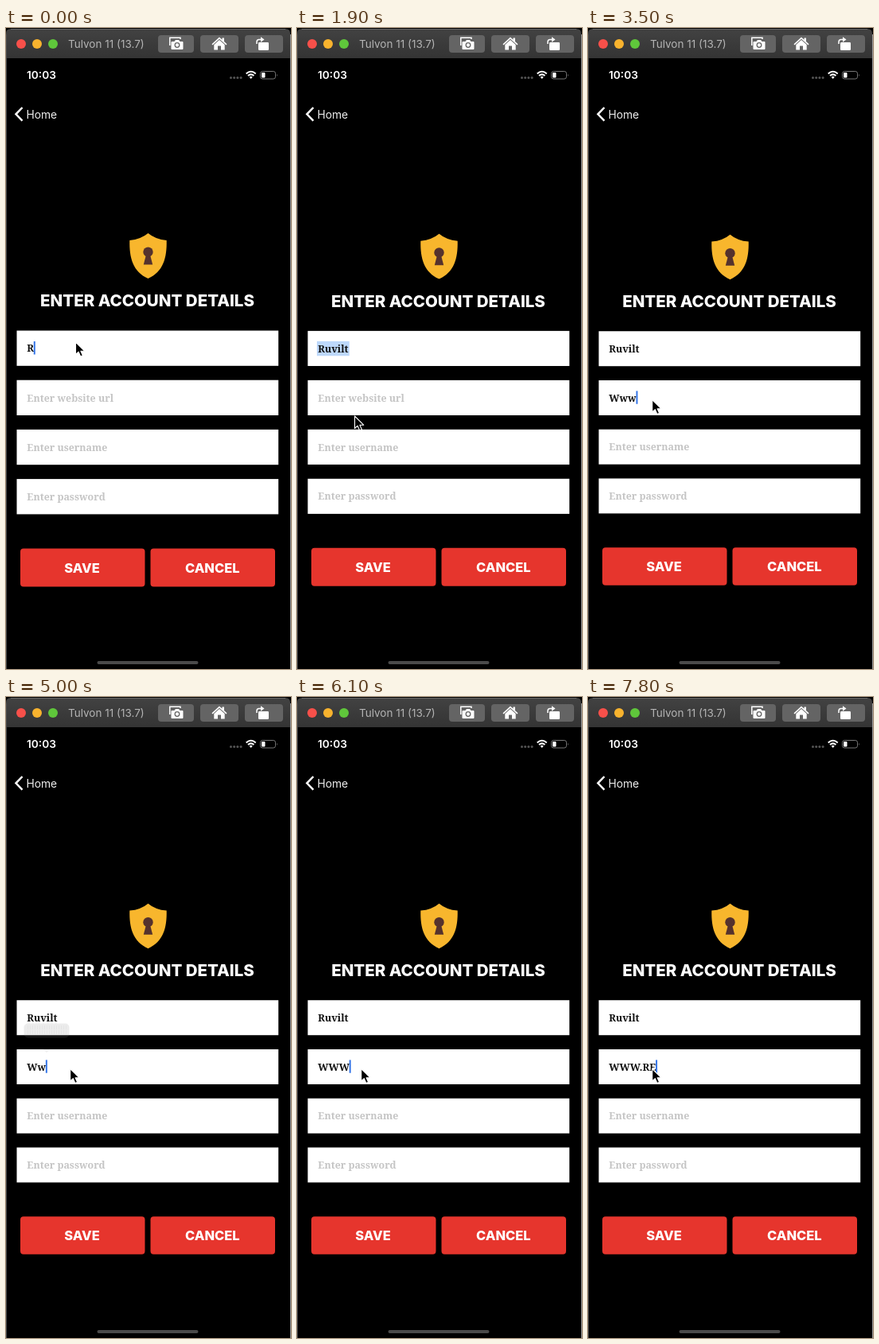
Write an HTML page that moves like this. It is 358 px wide and 806 px high and loops after 8000 ms.

```html
<!DOCTYPE html>
<html lang="en">
<head>
<meta charset="utf-8">
<title>Account details</title>
<style>
  html, body { margin: 0; width: 100%; height: 100%; overflow: hidden; background: #000; }
  svg { display: block; width: 100vw; height: 100vh; }
  text { font-family: Inter, Roboto, sans-serif; fill: #fff; white-space: pre; }
  .field { font: 600 12.4px "Noto Serif", "Liberation Serif", serif; }
  .heading { font-weight: 800; font-size: 20.5px; text-anchor: middle; }
  .button { font-weight: 800; font-size: 16.5px; text-anchor: middle; }
</style>
</head>
<body>
<svg viewBox="0 0 358 806" preserveAspectRatio="none">
  <defs>
    <linearGradient id="bar" x2="0" y2="1">
      <stop stop-color="#424242"/><stop offset="1" stop-color="#343434"/>
    </linearGradient>
  </defs>
  <rect width="358" height="806"/>

  <!-- window bar -->
  <path d="M0 38V7Q0 1 6 1H351Q357 1 357 7V38Z" fill="url(#bar)"/>
  <path d="M6 1.5H351" stroke="#6a6a6a"/>
  <path d="M.5 8V806" stroke="#4c4c4c"/>
  <path d="M357.5 8V806" stroke="#999"/>
  <circle cx="19" cy="20" r="6" fill="#f7504a"/>
  <circle cx="39" cy="20" r="6" fill="#f8b32e"/>
  <circle cx="59" cy="20" r="6" fill="#5fc73b"/>
  <text x="78" y="24.7" font-size="13.5" style="fill:#b4b4b4">Tulvon 11 (13.7)</text>
  <g fill="#646464">
    <rect x="191" y="9" width="45" height="22" rx="4"/>
    <rect x="244" y="9" width="48" height="22" rx="4"/>
    <rect x="300" y="9" width="48" height="22" rx="4"/>
  </g>
  <g fill="#fff">
    <path d="M205.8 22V12.300H219V14" fill="none" stroke="#fff" stroke-width="1.500"/>
    <path d="M208.500 17h3l1.500-2h4l1.500 2h3q1 0 1 1v8q0 1-1 1h-13q-1 0-1-1v-8q0-1 1-1Z"/>
    <circle cx="215" cy="21.500" r="2.800" fill="none" stroke="#646464" stroke-width="1.300"/>
    <path d="M258.500 20.300L268 11.500l3.500 3.200V12.500h2.500v4.500l3.500 3.300-1 1.200L268 13.800l-8.500 7.700Z"/>
    <path d="M261.300 21L268 15l6.700 6v6.500h-4.700v-5h-4v5h-4.700Z"/>
    <rect x="317" y="18" width="13" height="10" rx="1.300"/>
    <path d="M315 20v-2.500q0-3 3-3h3" fill="none" stroke="#fff" stroke-width="1.500"/>
    <path d="M320 11.200l4.500 3.300-4.500 3.300Z"/>
  </g>

  <!-- phone status -->
  <text x="26" y="64" font-size="13.7" font-weight="600">10:03</text>
  <g fill="#555">
    <circle cx="282.500" cy="62.500" r="1.500"/><circle cx="286.700" cy="62.500" r="1.500"/>
    <circle cx="290.900" cy="62.500" r="1.500"/><circle cx="295.100" cy="62.500" r="1.500"/>
  </g>
  <path d="M301.700 57.500Q307.700 52 313.700 57.500M304 60Q307.700 56.700 311.400 60" fill="none" stroke="#fff" stroke-width="2"/>
  <path d="M305.700 61.700Q307.700 60 309.700 61.700L307.700 64Z" fill="#fff"/>
  <rect x="319.500" y="54.500" width="19" height="9.500" rx="2.700" fill="none" stroke="#777"/>
  <rect x="321" y="56" width="4.500" height="6.500" rx="1" fill="#fff"/>
  <path d="M340 57.700q1.600 1.500 0 3.200Z" fill="#777"/>

  <path d="M20.500 100L12.500 108.300L20.500 116.600" fill="none" stroke="#fff" stroke-width="2.500"/>
  <text x="25.500" y="113.500" font-size="13.8" style="fill:#eee">Home</text>
  <rect x="114.500" y="796" width="127" height="4" rx="2" fill="#4a4a4a"/>

  <g id="form">
    <path d="M178.500 258Q169.500 265.700 155.300 267C154.700 289 159.500 306.500 178.500 315C197.500 306.500 202.300 289 201.700 267Q187.500 265.700 178.500 258Z" fill="#f8b62d"/>
    <path d="M176 285h5l3.200 12.500h-11.400Z" fill="#55322d"/>
    <circle cx="178.500" cy="281.700" r="6.200" fill="#55322d"/>
    <text class="heading" x="177.500" y="350.2">ENTER ACCOUNT DETAILS</text>
    <g id="fields"></g>
    <g id="bubble">
      <rect x="22.500" y="410" width="57" height="18" rx="5" fill="#888" opacity=".16"/>
      <path d="M27 415H76M27 421H76" stroke="#888" stroke-width="5" stroke-dasharray="1 2" opacity=".07"/>
      <path d="M47 443h8l-4 4Z" fill="#888" opacity=".12"/>
    </g>
    <rect x="18" y="654.500" width="156.500" height="48" rx="4" fill="#e6352d"/>
    <rect x="181.500" y="654.500" width="156.500" height="48" rx="4" fill="#e6352d"/>
    <text class="button" x="95.500" y="684.500">SAVE</text>
    <text class="button" x="259.300" y="684.500">CANCEL</text>
  </g>

  <path id="pointer" d="M0 0V15.500L3.600 12.200L6.200 18L8.900 16.800L6.400 11.200H11.200Z" stroke="#fff" stroke-width="1.100" stroke-linejoin="round"/>
</svg>
<script>
const LOOP = 8000;
const $ = id => document.getElementById(id);

function add(parent, tag, attrs) {
  const el = document.createElementNS("http://www.w3.org/2000/svg", tag);
  for (const key in attrs) el.setAttribute(key, attrs[key]);
  return parent.appendChild(el);
}

const hints = ["Enter website name", "Enter website url", "Enter username", "Enter password"];
const fields = hints.map((hint, i) => {
  const y = 380.5 + i * 62.2;
  add($("fields"), "rect", { x: 13.5, y, width: 328.7, height: 44.3, fill: "#fff" });
  const mark = add($("fields"), "rect", { x: 25, y: y + 13, height: 18.5, fill: "#bdd8fb" });
  const text = add($("fields"), "text", { class: "field", x: 26.3, y: y + 26.8 });
  return { hint, y, mark, text };
});
const caret = add($("fields"), "rect", { width: 2, height: 16.5, fill: "#3576e8" });

// Each entry holds its value from the given time on.
const siteName = [[0, "R"], [200, "Ru"], [600, "Ruv"], [1000, "Ruvi"], [1200, "Ruvil"], [1400, "Ruvilt"]];
const siteUrl = [[0, ""], [2800, "W"], [3000, "Ww"], [3200, "Www"], [4700, "Ww"], [5200, "W"],
  [5400, ""], [5600, "W"], [5800, "WW"], [6000, "WWW"], [7000, "WWW."], [7600, "WWW.R"], [7700, "WWW.RE"]];
const squeeze = [[0, 0], [200, 0.25], [600, 0.5], [2700, 1]];
const path = [[0, 87.5, 395], [1500, 87.5, 395], [1800, 72.5, 488], [2000, 72.5, 488], [2400, 80.7, 467.5], [LOOP, 80.7, 467.5]];

const held = (steps, t) => steps.filter(s => s[0] <= t).pop()[1];

function pointerAt(t) {
  const i = path.findIndex(p => p[0] > t);
  const [t0, x0, y0] = path[i - 1], [t1, x1, y1] = path[i];
  const u = (t - t0) / (t1 - t0), e = u * u * (3 - 2 * u);
  return [x0 + (x1 - x0) * e, y0 + (y1 - y0) * e];
}

function draw(t) {
  const values = [held(siteName, t), held(siteUrl, t), "", ""];
  const focus = t < 2400 ? 0 : 1;
  const selected = t >= 1800 && t < 2200;

  fields.forEach((f, i) => {
    f.text.textContent = values[i] || f.hint;
    f.text.style.fill = values[i] ? "#111" : "#c5c5c5";
    f.mark.setAttribute("width", selected && i === 0 ? f.text.getComputedTextLength() + 2.5 : 0);
  });

  const active = fields[focus];
  const width = values[focus] ? active.text.getComputedTextLength() : 0;
  caret.setAttribute("x", 26 + width);
  caret.setAttribute("y", active.y + 13.5);
  caret.setAttribute("opacity", selected ? 0 : 1);

  const k = 1 - 0.0075 * held(squeeze, t);
  $("form").setAttribute("transform", `translate(0 ${480 * (1 - k)}) scale(1 ${k})`);
  $("bubble").setAttribute("opacity", Math.max(0, 1 - Math.abs(t - 5000) / 200));
  $("pointer").setAttribute("transform", `translate(${pointerAt(t)})`);
}

const start = performance.now();
function tick() {
  draw((performance.now() - start) % LOOP);
  requestAnimationFrame(tick);
}
tick();
</script>
</body>
</html>
```
